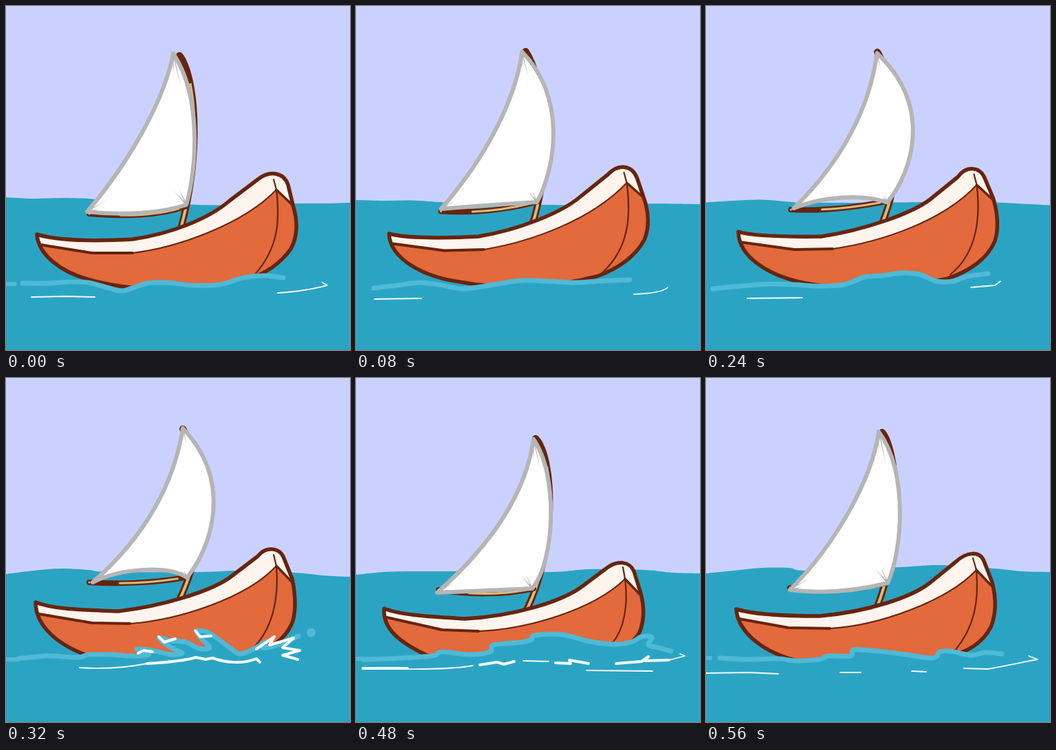
Write an HTML page that moves like this. It is 500 px wide and 500 px high and loops after 0.64 s.

```html
<!DOCTYPE html>
<html lang="en">
<head>
<meta charset="utf-8">
<title>Sailing boat</title>
<style>
html, body { margin: 0; width: 100%; height: 100%; overflow: hidden; background: #cbd1ff; }
svg { display: block; width: 100%; height: 100%; }
path { fill: none; stroke-linecap: round; stroke-linejoin: round; }
.wood { stroke: #66250f; }
.tan { stroke: #d8bb7c; }
.foam { stroke: #50b9d6; }
.white { stroke: #f4fcff; }
#mast, #mastCore { stroke-linecap: butt; }
</style>
</head>
<body>
<svg viewBox="0 0 500 500">
  <rect width="500" height="500" fill="#cbd1ff"/>
  <path id="sea" style="fill:#2ba4c4"/>
  <path id="mast" class="wood" stroke-width="10"/>
  <path id="mastCap" class="wood" stroke-width="10" pathLength="100" stroke-dasharray="4 200"/>
  <path id="mastCore" class="tan" stroke-width="4" pathLength="100" stroke-dasharray="0 17 100"/>
  <path id="boom" class="wood" stroke-width="8"/>
  <path id="boomCore" class="tan" stroke-width="3" pathLength="100" stroke-dasharray="0 32 60 100"/>
  <path id="sail" style="fill:#fff" stroke="#b5b5b5" stroke-width="6"/>
  <path id="creases" style="fill:#b5b5b5"/>
  <path id="deck" style="fill:#fff4ee"/>
  <path id="hull" style="fill:#e26a3c"/>
  <path id="rim" class="wood" stroke-width="2"/>
  <path id="rimBold" class="wood" stroke-width="4"/>
  <path id="bowRim" class="wood" stroke-width="3.5"/>
  <path id="stem" class="wood" stroke-width="2.2"/>
  <path id="outline" class="wood" stroke-width="5.5"/>
  <path id="front" style="fill:#2ba4c4"/>
  <path id="gaps" style="fill:#e26a3c"/>
  <path id="crest" class="foam" stroke-width="7"/>
  <path id="spray" class="foam" stroke-width="6"/>
  <path id="thin" class="white" stroke-width="1.8"/>
  <path id="bold" class="white" stroke-width="4"/>
</svg>
<script>
const STEP = 80;
const HORIZON_X = [0, 40, 80, 120, 150, 280, 340, 420, 460, 500];

// Boat poses by step; steps left out lie halfway between their neighbours.
const boats = {
  0: {
    horizon: '278 280 279 280 283 289 289 287 287 286',
    top: 'M45 332C75 341 130 342 184 339C240 331 295 309 325 283L366 252C384 238 404 242 410 260L417 289',
    low: 'M50 347L125 359L184 359C250 351 345 317 393 267L417 290',
    side: 'C424 312 424 335 414 353C400 373 380 388 350 398C270 418 180 415 118 397C80 386 47 362 45 332Z',
    stem: 'M389 252L393 267C398 310 397 350 362 390',
    sail: 'M243 69C232 130 185 220 118 299C170 305 225 301 262 289C278 235 284 130 243 69Z',
    mast: 'M252 72C275 100 285 210 254 324',
    boom: 'M121 302C170 306 220 306 262 291', crease: '1'
  },
  2: {
    horizon: '286 286 286 290 290 289 289 288 288 290',
    top: 'M51 330C70 334 130 334 172 331C232 320 300 293 325 273L366 238C378 220 398 219 407 240L419 267',
    low: 'M57 344L132 352L188 349C260 334 340 305 394 247L419 267',
    side: 'C427 285 430 308 424 327C414 352 385 375 350 388C290 405 230 407 190 406C110 402 52 370 51 330Z',
    stem: 'M390 232L394 247C402 300 397 355 353 386',
    sail: 'M240 64C232 140 195 218 129 291C170 277 220 274 264 281C302 235 330 140 240 64Z',
    mast: 'M241 60C270 110 292 220 258 314',
    boom: 'M126 295C170 296 215 289 268 277', crease: '.45'
  },
  4: {
    horizon: '285 280 277 279 282 282 280 283 287 289',
    top: 'M43 326C70 337 120 337 163 339C225 332 300 310 328 288L366 259C378 244 398 246 404 262L416 292',
    low: 'M48 343L125 356L180 357C250 352 350 320 393 273L416 297',
    side: 'C422 320 421 345 415 358C405 380 385 395 350 405C270 418 170 418 118 403C75 388 43 360 43 326Z',
    stem: 'M389 257L393 273C397 320 388 365 357 395',
    sail: 'M257 73C245 150 205 228 126 297C165 277 235 271 263 290C300 245 330 150 257 73Z',
    mast: 'M257 74C285 120 300 225 250 327',
    boom: 'M121 297C160 300 215 298 260 290', crease: '.5'
  },
  5: {
    horizon: '287 286 281 279 282 288 289 285 286 288',
    top: 'M40 324C65 333 110 338 156 338C220 337 290 318 326 297L366 272C380 258 398 262 404 278L413 305',
    low: 'M42 341L115 354L180 358C250 353 350 330 391 287L413 312',
    side: 'C419 330 416 350 408 362C395 385 375 400 350 405C270 420 170 418 105 400C65 380 38 352 40 324Z',
    stem: 'M388 270L391 287C393 330 378 375 352 402',
    sail: 'M262 80C250 155 205 225 118 298C165 291 215 291 258 298C308 225 306 150 262 80Z',
    mast: 'M265 80C285 110 300 230 247 332',
    boom: 'M119 299C165 306 215 304 256 296', crease: '.8'
  },
  6: {
    horizon: '286 282 281 281 281 282 278 279 283 284',
    top: 'M41 335C65 345 110 347 158 350C230 346 300 325 330 302L362 278C380 263 398 267 404 281L413 310',
    low: 'M45 348L125 366L178 368C250 365 345 337 391 292L413 315',
    side: 'C419 330 420 350 412 370C400 390 380 400 350 405C270 420 170 418 103 403C65 385 38 365 41 335Z',
    stem: 'M388 275L391 292C396 330 390 365 372 386',
    sail: 'M258 89C248 160 205 235 118 312C165 310 210 308 256 306C290 265 294 140 258 89Z',
    mast: 'M261 88C288 115 293 250 246 341',
    boom: 'M120 308C160 315 215 316 258 306', crease: '.9'
  },
  7: {
    horizon: '284 280 276 276 280 275 272 277 281 282',
    top: 'M44 336C70 344 120 346 165 346C235 340 300 318 325 298L362 268C380 251 398 252 404 266L416 297',
    low: 'M48 350L120 363L180 364C250 360 350 325 393 279L415 302',
    side: 'C423 325 421 345 414 362C402 385 380 399 350 405C270 418 170 418 128 410C75 395 46 365 44 336Z',
    stem: 'M388 262L393 279C397 325 390 362 362 396',
    sail: 'M251 78C242 145 190 240 122 308C170 314 220 309 264 298C286 250 294 135 251 78Z',
    mast: 'M256 79C275 100 292 220 248 335',
    boom: 'M122 305C165 309 215 307 262 298', crease: '1'
  }
};

const waters = [
  {
    crest: '24 403 60 403 95 401 120 402 150 410 170 414 205 403 235 402 270 406 310 405 345 395 375 392 403 395',
    spray: 'M0 404H13',
    thin: 'M37 423L88 422L129 423M395 417C430 415 450 410 467 406L460 402'
  },
  {
    crest: '26 410 60 406 92 402 120 405 155 411 200 405 240 399 280 400 320 402 350 400 398 398',
    thin: 'M27 426L95 425M404 419C425 418 448 415 453 409'
  },
  {
    crest: '28 416 60 409 90 403 120 408 158 411 215 404 250 395 290 394 330 402 360 407 395 402',
    spray: 'M0 418H4',
    thin: 'M17 429L40 428L63 427M413 421C425 421 437 419 438 412L433 414'
  },
  {
    crest: '10 411 50 407 95 404 130 405 160 407 200 405 230 394 255 392 285 388 310 390 335 400 360 400 380 393 410 389',
    thin: 'M60 425L140 424M385 409L420 406L428 400'
  },
  {
    crest: '18 408 60 404 105 406 120 402 150 402 185 404 208 402 190 394 212 396 240 402 256 400 240 392 222 378 240 382 262 384 280 393 296 392 285 380 277 368 292 369 305 377 325 392 340 401 360 394 378 383 374 392 395 388 425 375',
    spray: 'M0 409H18',
    ring: 'M440 370a3.5 3.5 0 1 0 7 0a3.5 3.5 0 1 0 -7 0',
    thin: 'M107 421C150 424 180 420 205 415',
    bold: 'M192 400L200 396L213 398M222 376L230 384L246 379M275 367L282 376L298 375M205 415C240 413 260 411 276 406L290 409L300 407C320 414 345 416 364 408L369 413M364 394L390 376L383 388L418 378L402 392L427 396L402 403L424 409'
  },
  {
    crest: '45 409 75 408 82 397 104 405 110 397 135 401 158 409 173 401 180 391 205 386 215 373 240 376 248 364 270 357 295 360 318 372 336 388 351 402 366 396 384 375 402 357 418 353 430 356',
    spray: 'M0 410L45 409M424 374Q442 360 455 378M196 379h.1M466 368h.1M190 400Q240 382 262 398Q275 405 284 404',
    gaps: 'M205 389Q222 382 235 393Q215 396 205 389ZM272 376Q290 370 301 379Q285 383 272 376Z',
    thin: 'M45 421C100 424 170 420 205 415M297 392C320 420 330 405 335 416L345 417L350 413L356 417M350 416L376 404L370 415',
    bold: 'M183 393L203 389M215 375L226 373M250 367L268 363M408 353L430 355M440 379L457 379M205 415C235 418 255 402 275 406C295 410 305 405 312 412M388 408C405 402 420 394 440 397L404 412L443 413'
  },
  {
    crest: '10 409 50 408 110 404 125 398 165 402 195 398 200 388 240 384 255 380 260 374 300 373 340 383 375 387 400 384 415 376 430 377 425 388 440 392 458 397',
    spray: 'M0 408H10',
    thin: 'M10 422C60 424 140 424 170 418M243 411L280 412M335 425L431 426M455 410L478 404L471 401',
    bold: 'M10 422L75 422M180 417L205 413L215 416L230 412M290 414L312 415L310 410L338 415M378 415L415 412L425 405L420 411L455 410'
  },
  {
    crest: '20 407 60 409 105 408 130 411 165 409 178 404 210 404 215 395 250 397 290 402 330 407 340 398 355 397 385 403 405 399 430 401',
    spray: 'M0 407H6',
    thin: 'M0 429L62 428L105 430M195 428H225M299 426L320 427M375 422L410 423C440 418 465 412 482 409L469 404'
  }
];

const nums = s => s.match(/[\d.]+/g).map(Number);

function mix(a, b) {
  const out = {};
  for (const key in a) {
    const other = nums(b[key]);
    let i = 0;
    out[key] = a[key].replace(/[\d.]+/g, n => (+n + other[i++]) / 2);
  }
  return out;
}
boats[1] = mix(boats[0], boats[2]);
boats[3] = mix(boats[2], boats[4]);

// Smooth curve through a flat list of coordinates.
function smooth(list) {
  const pts = [];
  for (let i = 0; i < list.length; i += 2) pts.push([list[i], list[i + 1]]);
  const at = i => pts[Math.max(0, Math.min(pts.length - 1, i))];
  let d = 'M' + pts[0];
  for (let i = 0; i < pts.length - 1; i++) {
    const [p, a, b, q] = [at(i - 1), at(i), at(i + 1), at(i + 2)];
    const c1 = a.map((v, k) => v + (b[k] - p[k]) / 6);
    const c2 = b.map((v, k) => v - (q[k] - a[k]) / 6);
    d += `C${c1} ${c2} ${b}`;
  }
  return d;
}

function creases(sail, size) {
  const n = nums(sail);
  const fold = (x, y, dx, dy) => {
    const len = Math.hypot(dx, dy), u = -dy / len, v = dx / len;
    return `M${x + u} ${y + v}L${x + dx * size} ${y + dy * size}L${x - u} ${y - v}Z`;
  };
  const corner = (i, ...folds) => folds.map(f => fold(n[i], n[i + 1], ...f)).join('');
  return corner(0, [11, 48], [0, 34]) + corner(6, [28, -17], [20, -5]) + corner(12, [-18, -21], [-10, -23]);
}

const set = (id, d) => document.getElementById(id).setAttribute('d', d || '');

function draw(step) {
  const b = boats[step], w = waters[step];
  const horizon = nums(b.horizon).flatMap((y, i) => [HORIZON_X[i], y]);
  set('sea', smooth(horizon) + 'V500H0Z');
  for (const id of ['mast', 'mastCap', 'mastCore']) set(id, b.mast);
  for (const id of ['boom', 'boomCore']) set(id, b.boom);
  set('sail', b.sail);
  set('creases', creases(b.sail, +b.crease));
  set('deck', b.top + b.side);
  set('outline', b.top + b.side);
  set('hull', b.low + b.side);
  set('rim', b.low);
  set('rimBold', b.low.split('C')[0]);
  const low = nums(b.low);
  set('bowRim', `M${low.slice(-4, -2)}L${low.slice(-2)}`);
  set('stem', b.stem);

  const pts = nums(w.crest), crest = smooth(pts);
  set('front', `${crest}V500H${pts[0]}Z`);
  set('crest', crest);
  set('spray', (w.spray || '') + (w.ring || ''));
  set('gaps', w.gaps);
  set('thin', w.thin);
  set('bold', w.bold);
}

let shown = -1;
const start = performance.now();
function tick() {
  const step = Math.floor((performance.now() - start) / STEP) % waters.length;
  if (step !== shown) draw(shown = step);
  requestAnimationFrame(tick);
}
tick();
</script>
</body>
</html>
```
